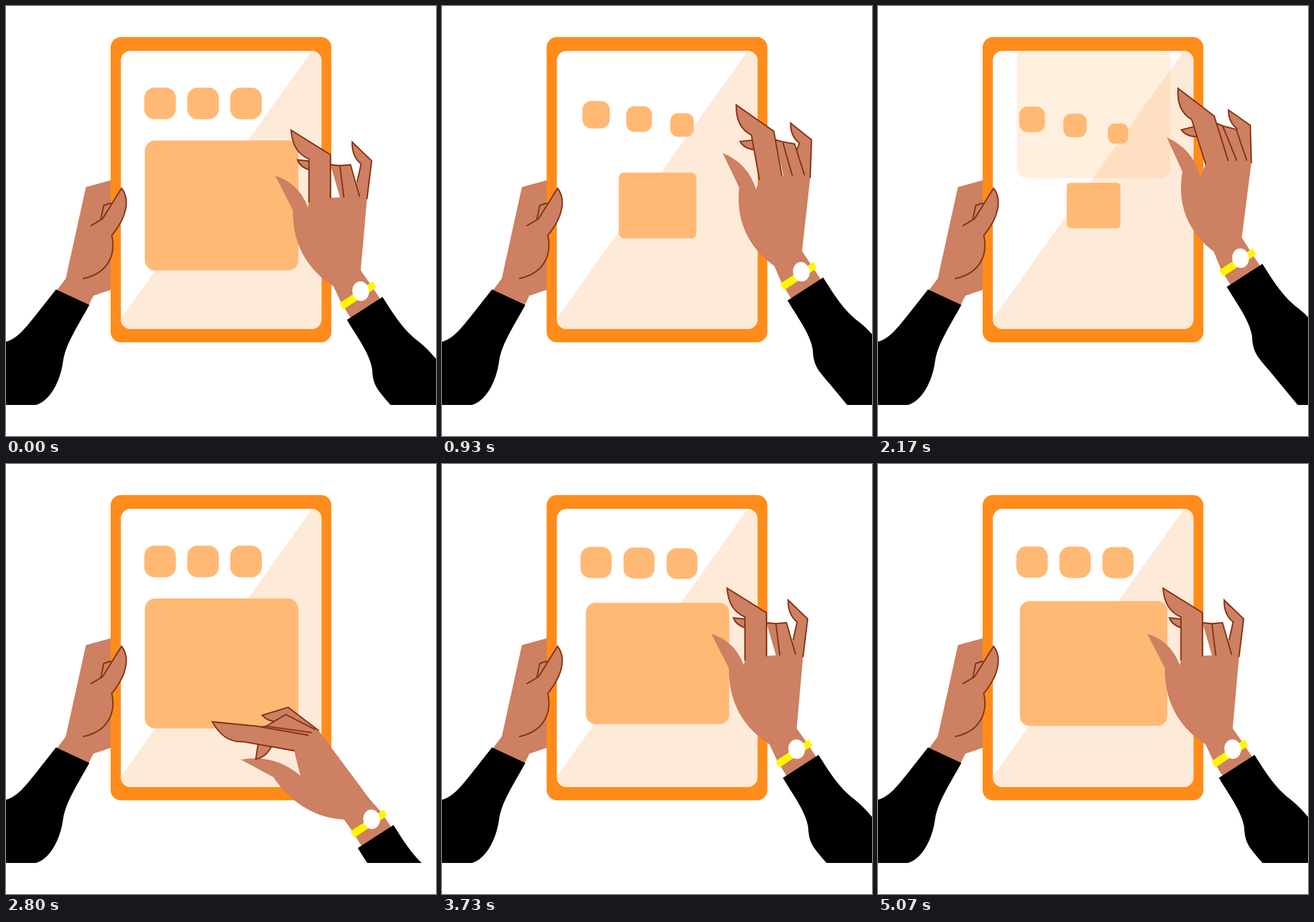
Recreate the animation shown at these times as an HTML page with a canvas. Size 748x748 px, loop 5110 ms.

```html
<!DOCTYPE html>
<html lang="en">
<head>
<meta charset="utf-8">
<title>Tablet swipe</title>
<style>
  html, body { margin: 0; width: 100%; height: 100%; overflow: hidden; background: #fff; }
  canvas { display: block; width: 748px; height: 748px; }
</style>
</head>
<body>
<canvas id="stage"></canvas>
<script>
const SIZE = 748, LOOP = 5110, CYCLE = LOOP / 4, FLOOR = 694;
const SKIN = '#cd8062', LINE = '#873515', ORANGE = '#ff8c1a', TILE = '#ffb974',
      BEAM = '#feead8', YELLOW = '#fff500';

const canvas = document.getElementById('stage');
const dpr = window.devicePixelRatio || 1;
canvas.width = canvas.height = SIZE * dpr;
const ctx = canvas.getContext('2d');

// ---- small maths ----
const mix = (a, b, k) => a + (b - a) * k;
const mixPt = (a, b, k) => [mix(a[0], b[0], k), mix(a[1], b[1], k)];
const add = (a, b, k = 1) => [a[0] + b[0] * k, a[1] + b[1] * k];
const smooth = k => k * k * (3 - 2 * k);
const clamp = k => Math.min(1, Math.max(0, k));

// Degrees clockwise from straight up.
const polar = (deg, r) => {
  const a = deg * Math.PI / 180;
  return [r * Math.sin(a), -r * Math.cos(a)];
};

const turned = ([x, y], deg) => {
  const [s, c] = polar(deg, 1);
  return [-x * c - y * s, x * s - y * c];
};

// Control point beside the line a-b: share along it, share to its left.
const bow = (a, b, along, left) => {
  const dx = b[0] - a[0], dy = b[1] - a[1];
  return [a[0] + dx * along + dy * left, a[1] + dy * along - dx * left];
};

// ---- drawing helpers ----
function fill(color) { ctx.fillStyle = color; ctx.fill(); }

function stroke() {
  ctx.strokeStyle = LINE;
  ctx.lineWidth = 2.4;
  ctx.lineJoin = 'miter';
  ctx.lineCap = 'round';
  ctx.stroke();
}

const join = (...pts) => pts.forEach(q => ctx.lineTo(...q));
const curve = (c, end) => ctx.quadraticCurveTo(...c, ...end);
const bezier = (a, b, end) => ctx.bezierCurveTo(...a, ...b, ...end);

function shape(color, ...pts) {
  ctx.beginPath();
  join(...pts);
  fill(color);
}

function box(x, y, w, h, r, color) {
  ctx.beginPath();
  ctx.roundRect(x, y, w, h, r);
  fill(color);
}

// ---- tablet ----
function tile(cx, cy, w, h, scale, alpha) {
  if (scale <= 0 || alpha <= 0) return;
  ctx.globalAlpha = alpha;
  box(cx - w * scale / 2, cy - h * scale / 2, w * scale, h * scale, 18 * scale, TILE);
  ctx.globalAlpha = 1;
}

const settle = (t, rate) => t <= 0 ? 0 : 1 - Math.exp(-rate * t * t / (t + 70));
const lift = t => t <= 0 ? 0 : (0.01305 * t) ** 3;
const fade = rise => 1 - (rise / 200) ** 1.2;

function drawContent(p) {
  const squares = [0, 1, 2].map(i => ({ i, x: 268 + 74.75 * i }));
  const rise = i => lift(p - 330 - 49 * i);

  tile(375, 347 - rise(3), 267, 226, 1, fade(rise(3)));
  for (const { i, x } of squares) tile(x, 169.5 - rise(i), 55, 55, 1, fade(rise(i)));

  tile(375, 347, 267, 226, settle(p - 805, 0.0087), 1);
  for (const { i, x } of squares) {
    const e = settle(p - 671 - 35 * i, 0.0098);
    tile(x, 169.5 + 146 * (1 - e), 55, 55, e, 1);
  }
}

function drawTablet(p) {
  box(182, 54, 384, 531, 18, ORANGE);
  ctx.save();
  ctx.beginPath();
  ctx.roundRect(199.5, 78, 349.5, 484, 17);
  ctx.clip();
  fill('#fff');
  shape(BEAM, [532, 78], [560, 78], [560, 570], [181, 570]);
  drawContent(p);
  ctx.restore();
}

// ---- left arm ----
function drawLeftArm() {
  shape(SKIN, [139, 315], [190, 301], [190, 491], [152, 504], [142, 524], [86, 498], [104, 474]);
  ctx.beginPath();
  join([87, 493], [50, 540]);
  bezier([30, 565], [18, 579], [0, 584]);
  join([0, FLOOR], [52, FLOOR]);
  bezier([75, 688], [94, 655], [99, 620]);
  bezier([103, 590], [120, 565], [145, 520]);
  fill('#000');
}

function drawLeftThumb() {
  const edge = () => {
    join([168, 370], [201, 317]);
    bezier([215, 335], [212, 365], [184, 399]);
    bezier([191, 430], [180, 464], [135, 474]);
  };
  ctx.beginPath();
  edge();
  fill(SKIN);
  ctx.beginPath();
  join([182, 343], [170, 347], [165, 371]);
  stroke();
  ctx.beginPath();
  join([148, 382]);
  edge();
  stroke();
}

// ---- right hand: watch x, y, turn of the palm, openness, size ----
const REST = [617, 496, 0, 1, 1], TOUCH = [636, 618, -35, 0, 1],
      PRESS = [642, 600, -44, 0, 1], TOP = [648, 366, 5.5, 0, 0.965];
const POSES = [REST, TOUCH, PRESS, TOP, REST];
const BEATS = [10, 245, 447, 735, 1029];

function poseAt(p) {
  const n = BEATS.findLastIndex(b => p >= b);
  if (n < 0 || n === POSES.length - 1) return REST;
  const k = smooth(clamp((p - BEATS[n]) / (BEATS[n + 1] - BEATS[n])));
  return POSES[n].map((v, i) => mix(v, POSES[n + 1][i], k));
}

// Joints from the pose: fingers are bones standing on a row of knuckles.
function buildHand([wx, wy, turn, open, size]) {
  const curl = 1 - open, j = {};
  const blend = (closed, opened) => mixPt(closed, opened, open);
  const knuckle = u => add(mixPt(j.i0, j.pb, 1 - (1 - u) * mix(0.57, 1, open)), [0, -5]);

  j.i0 = blend([-42, -175], [-90, -155]);
  j.pb = blend([13, -180], [11, -161]);
  j.ib = knuckle(0.37);
  j.g2 = knuckle(0.6);
  j.g3 = knuckle(0.87);
  j.root = [-25, -125];

  // index
  const bone = polar(-45 * curl, 75 + 16 * curl);
  j.i1 = add(j.i0, bone);
  j.ik = add(j.ib, bone);
  j.it = add(mixPt(j.i1, j.ik, 0.5), polar(-47 + 10 * curl, 68));
  j.ic = bow(j.i1, j.it, 0.42, 0.31);

  // middle fingertip
  j.m0 = mixPt(j.i0, j.i1, 0.7 + 0.25 * open);
  j.mt = add(j.m0, polar(-84 - 52 * curl, 20 + 6 * curl));
  j.me = add(j.m0, bone, -0.2 - 0.06 * curl);
  j.mc = bow(j.me, j.mt, 0.6, 0.25);

  // folded fingers
  j.f1 = add(j.ib, bone, 0.77 + 0.15 * curl);
  j.f2 = add(j.g2, polar(-7 - 40 * curl, 55 + 24 * curl));
  j.f3 = add(j.g3, polar(-16 - 12 * curl, 57));

  // little finger
  j.pk = add(j.pb, polar(7 - 25 * curl, 66));
  j.pt = add(j.pk, polar(-46 - 26 * curl, 47));
  j.pi = add(j.pk, polar(-106, 19 + 12 * curl));
  j.pe = mixPt(j.f3, add(j.pi, [-7, 31]), open);
  j.pc = bow(j.pi, j.pt, 0.45, 0.25);

  // thumb
  j.th = polar(-36.5 + 6 * curl, 250);
  j.cr = blend([-58, -133], [-92, -146]);
  j.tl = blend([-98, -158], [-118, -141]);
  j.tc = bow(j.cr, j.th, 0.5, -0.24);

  for (const n in j) j[n] = add([wx, wy], turned(j[n], turn), size);

  // the wrist follows the palm only in part
  const rim = (deg, share, r) => add([wx, wy], polar(deg + 6 * curl + share * turn, r));
  j.c1 = rim(-58, 0.8, 140);
  j.c2 = rim(-69, 0.75, 92);
  j.pl = rim(-80, 0.47, 48);
  j.wr = rim(0, 0.35, 36);
  return j;
}

function drawHand(h) {
  const part = path => {
    ctx.beginPath();
    path();
    join(h.root);
    fill(SKIN);
    ctx.beginPath();
    path();
    stroke();
  };

  ctx.beginPath();
  join(h.m0, h.mt);
  curve(h.mc, h.me);
  fill(SKIN);
  stroke();

  part(() => {
    join(h.pb, h.pk, h.pt);
    curve(h.pc, h.pi);
    join(h.pe);
  });
  part(() => join(h.f1, h.f2, h.f3, h.g3));
  part(() => {
    join(h.i0, h.i1);
    curve(h.ic, h.it);
    join(h.ik, h.ib);
  });
  ctx.beginPath();
  join(h.f2, h.g2);
  stroke();
}

function drawPalm(h, rel) {
  ctx.beginPath();
  join(h.th);
  curve(h.tc, h.cr);
  join(h.i0, h.ib, h.g3, h.pb, h.wr, rel(17, -12), rel(35, 15), rel(-15, 51), rel(-34, 20), h.pl);
  bezier(h.c2, h.c1, h.tl);
  fill(SKIN);
}

function drawWatch(rel) {
  shape(YELLOW, rel(-37, 21), rel(21, -17), rel(27, -6), rel(-30, 32));
  ctx.beginPath();
  ctx.ellipse(...rel(0, 0), 14.5, 17, -0.15, 0, 7);
  fill('#fff');
}

function drawSleeve(rel) {
  ctx.save();
  ctx.beginPath();
  ctx.rect(0, 0, SIZE, FLOOR);
  ctx.clip();
  ctx.beginPath();
  join(rel(38, 10));
  bezier(rel(60, 45), rel(75, 68), rel(100, 87));
  bezier(rel(118, 101), rel(131, 118), rel(150, 140));
  join(rel(190, 290), rel(128, 290), rel(51, 197));
  bezier(rel(30, 172), rel(21, 165), rel(20, 136));
  bezier(rel(16, 108), rel(-10, 74), rel(-24, 50));
  fill('#000');
  ctx.restore();
}

function drawRightArm(pose) {
  const rel = (x, y) => [pose[0] + x, pose[1] + y];
  const hand = buildHand(pose);
  drawPalm(hand, rel);
  drawHand(hand);
  drawWatch(rel);
  drawSleeve(rel);
}

function frame(now) {
  const p = (now % LOOP) % CYCLE;
  ctx.setTransform(dpr, 0, 0, dpr, 0, 0);
  ctx.fillStyle = '#fff';
  ctx.fillRect(0, 0, SIZE, SIZE);
  drawLeftArm();
  drawTablet(p);
  drawLeftThumb();
  drawRightArm(poseAt(p));
}

const begin = performance.now();
function tick() {
  frame(performance.now() - begin);
  requestAnimationFrame(tick);
}
tick();
</script>
</body>
</html>
```
